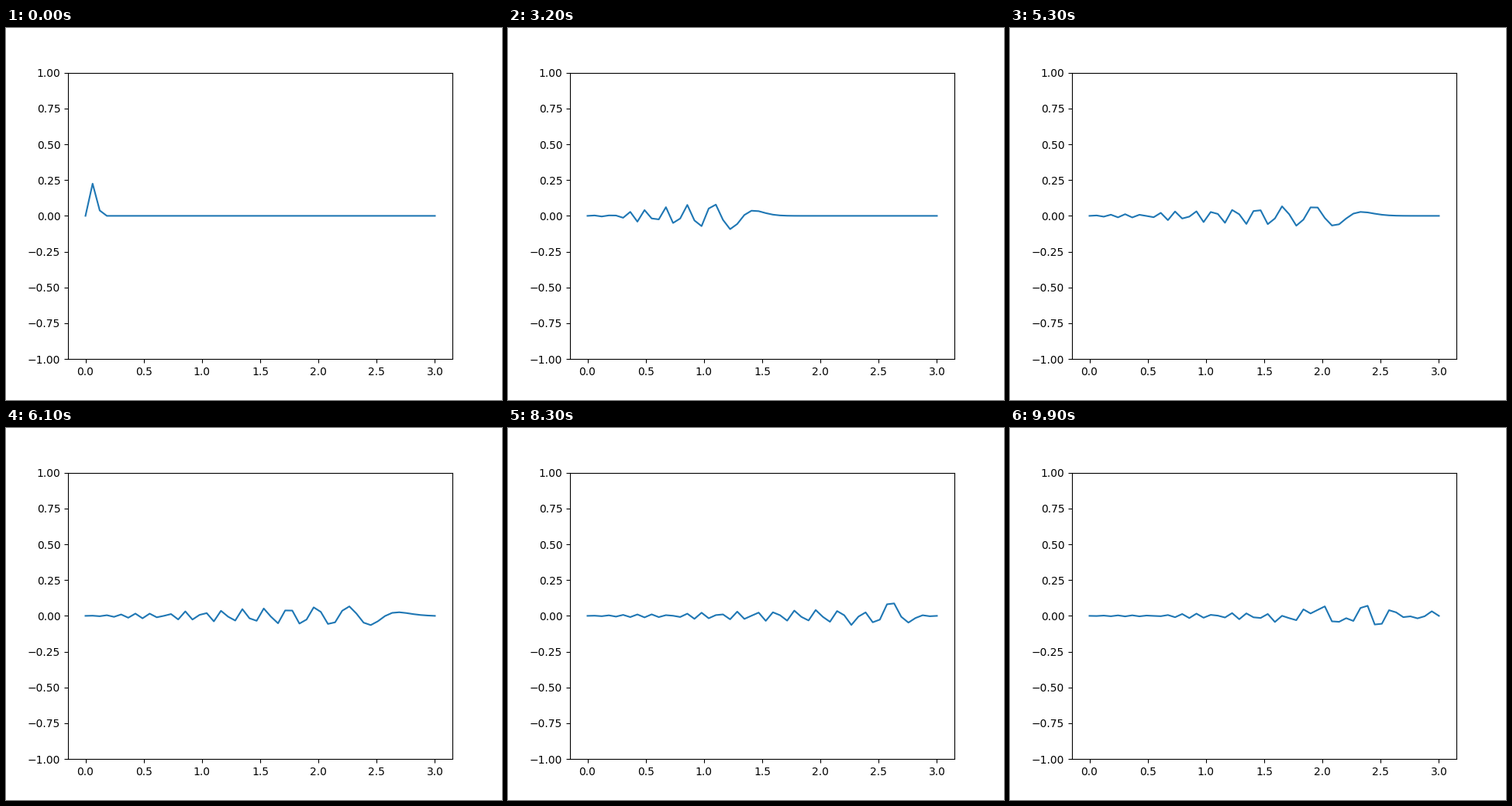
A matplotlib script that plays this animation: 640x480 px, repeating every 10 s.

```python
import numpy as np
import matplotlib.pyplot as plt
from matplotlib.animation import FuncAnimation

POINTS = 50
FRAMES = 100
STEPS_PER_FRAME = 2
R2 = 0.125  # squared Courant number


def simulate():
    """Leapfrog wave on a string with fixed ends, plucked beside the left end."""
    u = np.zeros(POINTS)
    u[1] = 0.3
    prev = u.copy()
    states = []
    for step in range(FRAMES * STEPS_PER_FRAME):
        new = np.zeros(POINTS)
        lap = u[2:] - 2 * u[1:-1] + u[:-2]
        new[1:-1] = 2 * u[1:-1] - prev[1:-1] + R2 * lap
        prev, u = u, new
        if step % STEPS_PER_FRAME == 0:
            states.append(u)
    return states


x = np.linspace(0, 3, POINTS)
states = simulate()

fig, ax = plt.subplots(figsize=(6.4, 4.8), dpi=100)
line, = ax.plot(x, states[0])
ax.set_ylim(-1, 1)


def update(i):
    line.set_ydata(states[i])
    return line,


anim = FuncAnimation(fig, update, frames=FRAMES, interval=100, repeat=True)
plt.show()
```
